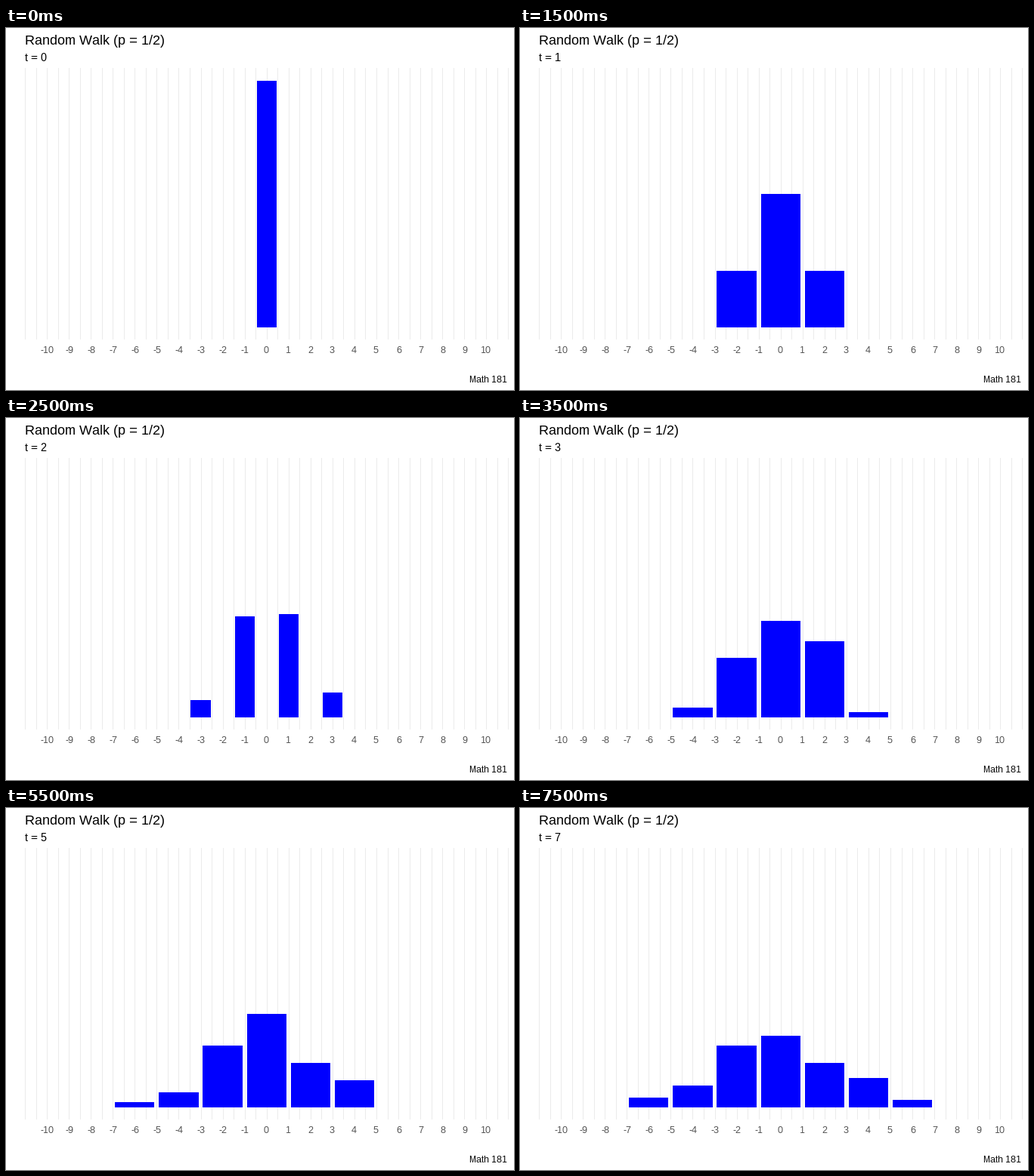
A matplotlib script that plays this animation: 672 by 480 pixels, repeating every 8000 ms.

```python
import matplotlib.pyplot as plt
from matplotlib.animation import FuncAnimation
from matplotlib.patches import Rectangle

plt.rcParams.update({
    "toolbar": "None",
    "font.family": "Liberation Sans",
    "text.hinting": "native",
    "text.hinting_factor": 1,
    "text.kerning_factor": 6,
})

W, H, DPI = 672, 480, 96
TOP, BOTTOM = 53, 413        # panel
BASE, UNIT = 397, 360 / 110  # foot of the bars, pixels per walker
MID, STEP = 344.7, 29.06     # pixel of position 0, pixels per position

# Walkers at positions -t, -t + 2, ... after t steps.
COUNTS = [
    (100,),
    (50, 50),
    (23, 54, 23),
    (7, 41, 42, 10),
    (4, 24, 39, 31, 2),
    (2, 14, 33, 34, 17),
    (2, 6, 25, 38, 18, 11),
    (1, 4, 14, 37, 24, 14, 6),
    (0, 4, 9, 25, 29, 18, 12, 3),
]

fig = plt.figure(figsize=(W / DPI, H / DPI), dpi=DPI, facecolor="white")
ax = fig.add_axes([0, 0, 1, 1])
ax.set(xlim=(0, W), ylim=(H, 0))
ax.axis("off")


def px(pos):
    return MID + pos * STEP


def box(x0, y0, x1, y1, color, z):
    rect = Rectangle((x0, y0), x1 - x0, y1 - y0, fc=color, lw=0,
                     antialiased=False, zorder=z)
    return ax.add_patch(rect)


def label(x, y, text, size, color="black"):
    return ax.text(x, y, text, fontsize=size * 72 / DPI, color=color,
                   va="baseline", ha="left")


for k in range(-22, 23):
    x = round(px(k / 2))
    box(x, TOP, x + 1, BOTTOM, "#EBEBEB", 1)

for n in range(-10, 11):
    advance = 7 * len(str(abs(n))) + 4 * (n < 0)
    label(round(px(n) - advance / 2), 431, str(n), 12, "#4D4D4D")

label(25, 22, "Random Walk (p = 1/2)", 18)
label(613, 470, "Math 181", 12)
clock = label(25, 44, "t = 0", 15)
bars = [box(0, BASE, 0, BASE, "#0000FF", 2) for _ in COUNTS]


def update(i):
    # The bars step half a second ahead of the clock.
    clock.set_text(f"t = {i // 2}")
    t = (i + 1) // 2
    half = 0.9 if t and t % 2 == 0 else 0.45
    for j, bar in enumerate(bars):
        n = COUNTS[t][j] if j < len(COUNTS[t]) else 0
        bar.set_visible(n > 0)
        pos = 2 * j - t
        left, right = round(px(pos - half)), round(px(pos + half))
        top = round(BASE - n * UNIT)
        bar.set_bounds(left, top, right - left, BASE - top)
    return [clock, *bars]


anim = FuncAnimation(fig, update, frames=16, interval=500, repeat=True,
                     repeat_delay=0, blit=False)
plt.show()
```
